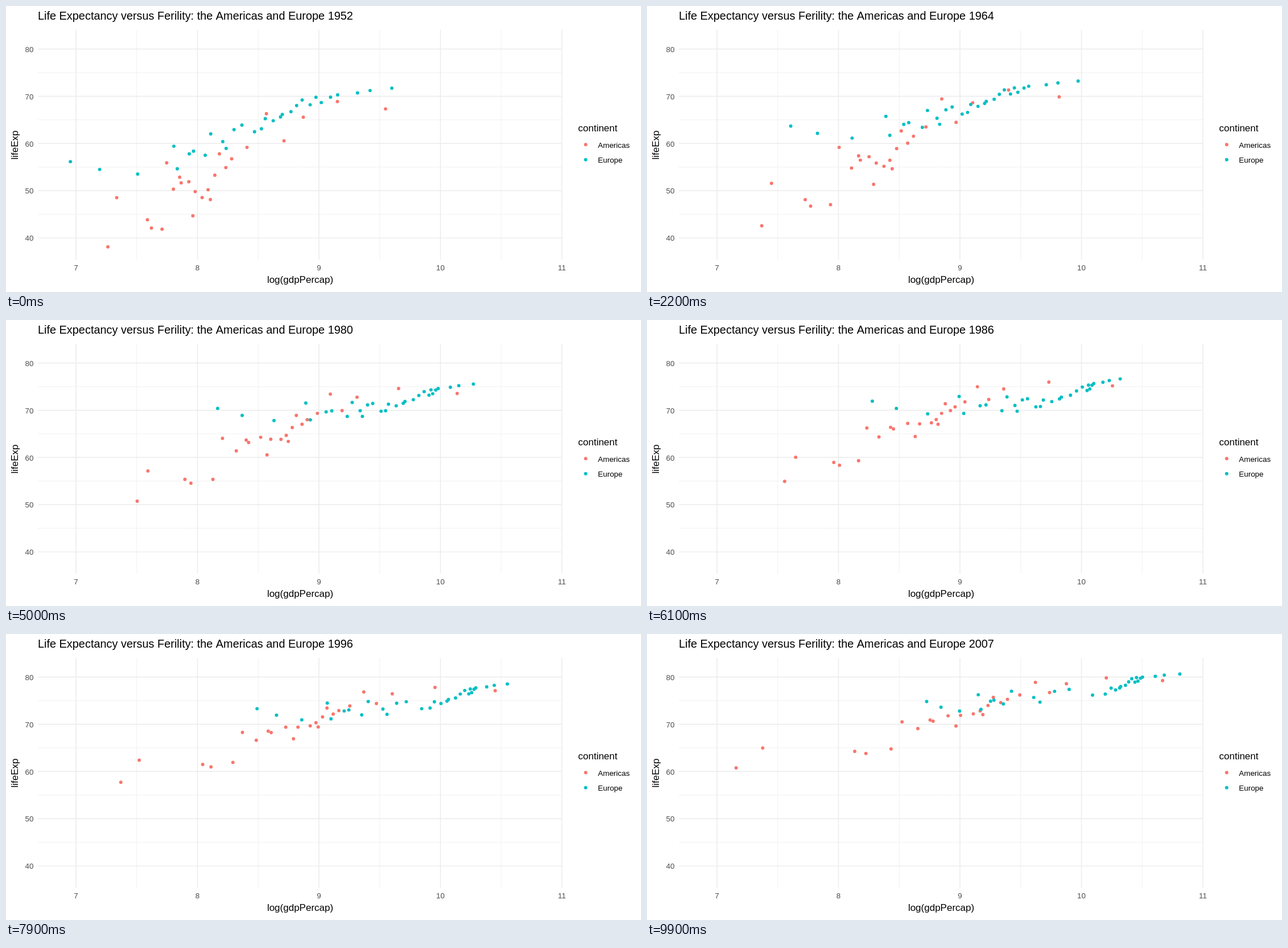
Recreate the animation shown at these times as an HTML page with a canvas. Size 1116 by 502 pixels, loop 10000 ms.

```html
<!DOCTYPE html>
<html lang="en">
<head>
<meta charset="utf-8">
<title>Life expectancy chart</title>
<style>
html, body { margin: 0; width: 100%; height: 100%; overflow: hidden; background: #fff; }
canvas { display: block; }
</style>
</head>
<body>
<canvas id="stage" width="1116" height="502"></canvas>
<script>
const ctx = document.getElementById('stage').getContext('2d');
const FONT = '"Liberation Sans", Arial, sans-serif';
const GREY = '#4D4D4D', GRID = '#EBEBEB';
const STEPS = 100, STEP_MS = 100, RADIUS = 2.95;
const FIRST_YEAR = 1952, LAST_YEAR = 2007;
const PANEL = { left: 56, right: 977, top: 42, bottom: 445 };

// Key years, and the ranks (0 = poorest, 1 = richest) where income is given.
const YEARS = [1952, 1972, 1986, 2007];
const INCOME_RANKS = [0, 0.1, 0.25, 0.5, 0.75, 0.9, 1];
const LIFE_RANKS = [0, 0.5, 1];

// Per key year: income by rank, life expectancy by rank, spread around it.
const GROUPS = [
  {
    name: 'Americas', color: '#F8766D', size: 25, seed: 11, legendY: 243.2,
    income: [
      [7.24, 7.61, 7.8, 8.03, 8.28, 8.84, 9.55],
      [7.41, 7.84, 8.3, 8.58, 8.83, 9.22, 9.99],
      [7.53, 7.99, 8.33, 8.76, 8.96, 9.32, 10.26],
      [7.09, 8.2, 8.65, 9.1, 9.39, 9.84, 10.67]
    ],
    life: [[47, 52, 68], [52, 62, 72], [59, 69, 75.5], [64, 73.5, 79.5]],
    spread: [12, 9, 5.5, 4.5]
  },
  {
    name: 'Europe', color: '#00BFC4', size: 30, seed: 29, legendY: 269.8,
    income: [
      [6.88, 7.78, 8.08, 8.55, 8.89, 9.18, 9.6],
      [7.96, 8.73, 9.11, 9.42, 9.71, 9.84, 10.21],
      [8.22, 8.96, 9.37, 9.68, 10.04, 10.11, 10.32],
      [8.69, 9.13, 9.37, 10.24, 10.43, 10.51, 10.81]
    ],
    life: [[54, 65, 71.5], [67, 70, 74], [70.5, 72, 76.5], [73.5, 77.5, 80.5]],
    spread: [3.5, 2.5, 2.5, 2.2]
  }
];

const px = v => 123 + 213.5 * (v - 7);
const py = v => 75.5 + 8.29 * (80 - v);
const clamp01 = v => Math.min(1, Math.max(0, v));

function seeded(seed) {
  return () => {
    seed = (seed * 16807) % 2147483647;
    return seed / 2147483647;
  };
}

// Piecewise linear curve through the points (xs[i], ys[i]).
function curve(xs, ys, x) {
  let i = 1;
  while (i < xs.length - 1 && x > xs[i]) i++;
  const u = (x - xs[i - 1]) / (xs[i] - xs[i - 1]);
  return ys[i - 1] + (ys[i] - ys[i - 1]) * u;
}

// Every dot keeps its rank and its offset from the trend.
function makeDots({ size, seed }) {
  const random = seeded(seed * 7919);
  const signed = () => 2 * random() - 1;
  return Array.from({ length: size }, (_, i) => ({
    rank: clamp01((i + 0.4 * signed()) / (size - 1)),
    offset: signed()
  }));
}
GROUPS.forEach(group => { group.dots = makeDots(group); });

function line(x1, y1, x2, y2, width) {
  ctx.strokeStyle = GRID;
  ctx.lineWidth = width;
  ctx.beginPath();
  ctx.moveTo(x1, y1);
  ctx.lineTo(x2, y2);
  ctx.stroke();
}

function text(str, x, y, size, color = '#000', align = 'left') {
  ctx.font = size + 'px ' + FONT;
  ctx.fillStyle = color;
  ctx.textAlign = align;
  ctx.fillText(str, x, y);
}

function disc(x, y, color) {
  ctx.fillStyle = color;
  ctx.beginPath();
  ctx.arc(x, y, RADIUS, 0, 2 * Math.PI);
  ctx.fill();
}

function drawGrid() {
  const { left, right, top, bottom } = PANEL;
  const row = (v, w) => line(left, py(v), right, py(v), w);
  const col = (v, w) => line(px(v), top, px(v), bottom, w);
  for (let v = 45; v < 80; v += 10) row(v, 0.75);
  for (let v = 7.5; v < 11; v++) col(v, 0.75);
  for (let v = 40; v <= 80; v += 10) {
    row(v, 1.45);
    text(v, 48.5, py(v) + 5.2, 13.4, GREY, 'right');
  }
  for (let v = 7; v <= 11; v++) {
    col(v, 1.45);
    text(v, px(v), 464, 13.4, GREY, 'center');
  }
}

function drawLabels(year) {
  text('Life Expectancy versus Ferility: the Americas and Europe ' + Math.round(year), 56, 24, 19.9);
  text('log(gdpPercap)', 517, 486, 17, '#000', 'center');
  ctx.save();
  ctx.translate(21, 244);
  ctx.rotate(-Math.PI / 2);
  text('lifeExp', 0, 0, 17, '#000', 'center');
  ctx.restore();
  text('continent', 1005.5, 220, 17);
  GROUPS.forEach(({ name, color, legendY }) => {
    disc(1018.8, legendY, color);
    text(name, 1040.3, legendY + 5.4, 13.4);
  });
}

function drawGroup({ color, income, life, spread, dots }, year) {
  const trend = (ranks, rows, rank) =>
    curve(YEARS, rows.map(row => curve(ranks, row, rank)), year);
  const width = curve(YEARS, spread, year);
  dots.forEach(({ rank, offset }) => {
    const age = trend(LIFE_RANKS, life, rank) + offset * width * (1 - 0.8 * rank);
    disc(px(trend(INCOME_RANKS, income, rank)), py(age), color);
  });
}

const start = performance.now();
function render() {
  const elapsed = Math.max(0, performance.now() - start);
  const step = Math.floor(elapsed / STEP_MS) % STEPS;
  const year = FIRST_YEAR + (LAST_YEAR - FIRST_YEAR) * step / (STEPS - 1);
  ctx.fillStyle = '#fff';
  ctx.fillRect(0, 0, 1116, 502);
  drawGrid();
  drawLabels(year);
  GROUPS.forEach(group => drawGroup(group, year));
  requestAnimationFrame(render);
}
render();
</script>
</body>
</html>
```
